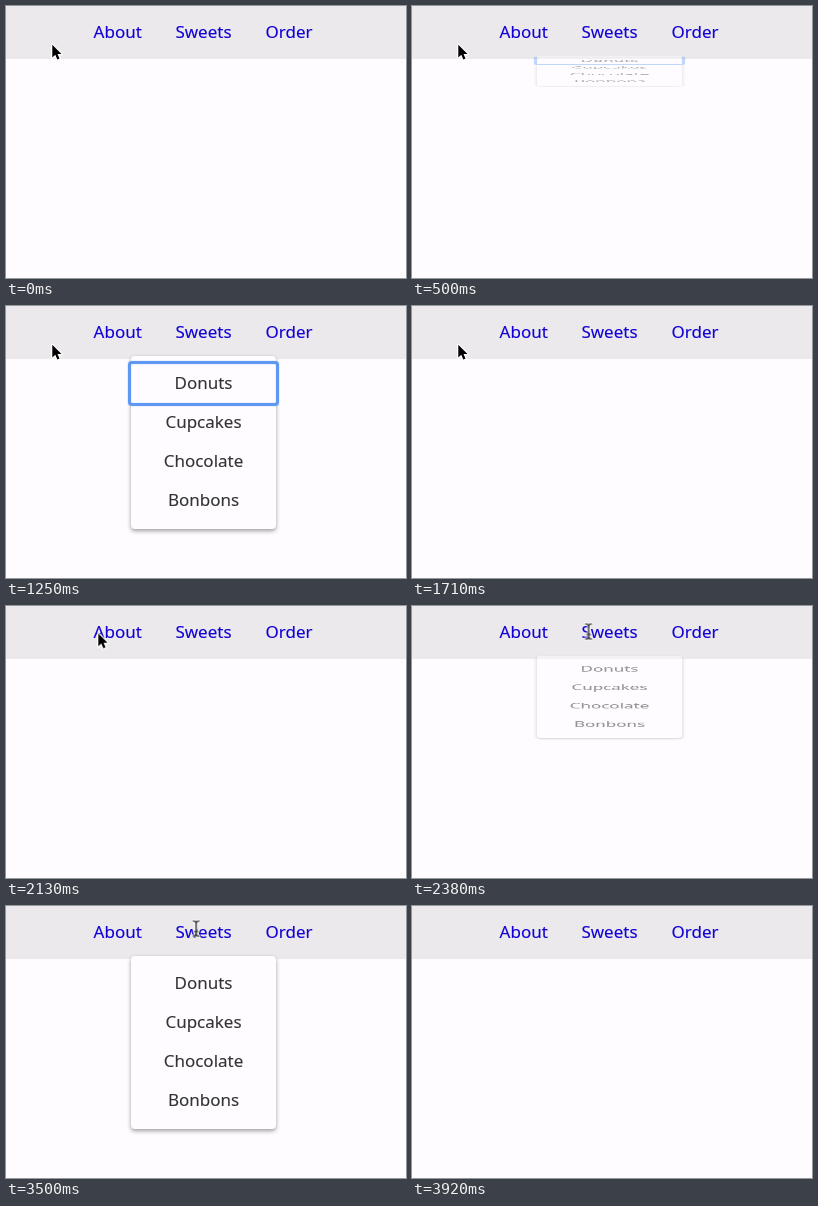
Recreate the animation shown at these times as an HTML page. Size 400 by 272 pixels, loop 3.96 s.

```html
<!DOCTYPE html>
<html lang="en">
<head>
<meta charset="utf-8">
<title>Dropdown menu</title>
<style>
  html, body { margin: 0; width: 100%; height: 100%; overflow: hidden; background: #fefcff; }
  .stage {
    position: relative; width: 400px; height: 272px; overflow: hidden;
    font: 17px "Noto Sans", sans-serif; color: #333;
    -webkit-text-stroke: .12px;
  }
  .stage * { box-sizing: border-box; }

  nav { position: absolute; inset: 0 0 auto; height: 53px; background: #ebe9eb; }
  nav span {
    position: absolute; left: var(--x); transform: translateX(-50%);
    line-height: 51px; color: #1200d6;
  }

  .ring {
    position: absolute; border: 3px solid #5f98f0; border-radius: 4px;
    box-shadow: 0 0 1px #5f98f0, inset 0 0 1px #5f98f0;
  }
  .menu, .ring, .cursor, .arrow, .beam { animation: 3960ms step-end infinite; }
  .about-ring { left: 74px; top: -6px; width: 76px; height: 64px; animation-name: about-ring; }
  .item-ring { left: -3px; top: 4.5px; width: 151px; height: 45.5px; animation-name: item-ring; }

  .menu {
    position: absolute; left: 125px; top: 50px; width: 145px; height: 172.5px;
    padding-top: 7px; border-radius: 4px; background: #fefcff;
    box-shadow: 0 2px 4px rgba(0, 0, 0, .38);
    text-align: center; line-height: 39px;
    transform-origin: top; animation-name: menu;
  }

  .pointer { position: absolute; inset: 0; width: 400px; height: 272px; }
  .cursor { animation-name: cursor; }
  .arrow { animation-name: arrow; }
  .beam { animation-name: beam; }

  @keyframes about-ring {
    0%, 12.626%, 100% { opacity: 0; }
    2.02% { opacity: 1; }
  }
  @keyframes item-ring {
    0%, 41.162%, 100% { opacity: 0; }
    12.247% { opacity: 1; }
  }
  /* Flips open, closes at once: by keyboard first, then by hover. */
  @keyframes menu {
    0%, 41.162%, 92.929%, 100% { opacity: 0; transform: rotateX(-90deg); }
    12.247%, 58.687% { opacity: .3; transform: rotateX(-90deg); animation-timing-function: ease-out; }
    18.182%, 65.758% { opacity: 1; transform: rotateX(0deg); }
  }
  @keyframes cursor {
    0% { transform: translate(46px, 38px); }
    46.212% { transform: translate(46px, 38px); animation-timing-function: ease-in; }
    54.293% { transform: translate(97px, 25.5px); animation-timing-function: linear; }
    60.101% { transform: translate(176.5px, 25.5px); animation-timing-function: ease-out; }
    67.424% { transform: translate(190px, 25.5px); }
    87.374% { transform: translate(190px, 25.5px); animation-timing-function: ease-in; }
    91.919%, 100% { transform: translate(192px, -12px); }
  }
  @keyframes arrow {
    0% { opacity: 1; }
    54.293%, 100% { opacity: 0; }
  }
  @keyframes beam {
    0%, 91.919%, 100% { opacity: 0; }
    54.293% { opacity: 1; }
  }
</style>
</head>
<body>
<div class="stage">
  <nav>
    <span style="--x: 111.7px">About</span>
    <span style="--x: 197.5px">Sweets</span>
    <span style="--x: 283px">Order</span>
  </nav>
  <div class="ring about-ring"></div>
  <div class="menu">
    <div>Donuts</div>
    <div>Cupcakes</div>
    <div>Chocolate</div>
    <div>Bonbons</div>
    <div class="ring item-ring"></div>
  </div>
  <svg class="pointer" viewBox="0 0 400 272">
    <defs>
      <path id="beam" fill="none" stroke-linecap="round"
        d="M-3-7.5q3 0 3 2V5.5q0 2-3 2M3-7.5q-3 0-3 2M3 7.5q-3 0-3-2M-2 3h4"/>
    </defs>
    <g class="cursor">
      <path class="arrow" d="M.3.8V13.6l3-2.8 2 4.6 2.2-.9-2-4.5h4z"
        stroke="#fff" stroke-width="2.4" stroke-linejoin="round" paint-order="stroke"/>
      <g class="beam">
        <use href="#beam" stroke="#fff" stroke-width="2.8"/>
        <use href="#beam" stroke="#111" stroke-width="1.2"/>
      </g>
    </g>
  </svg>
</div>
</body>
</html>
```
